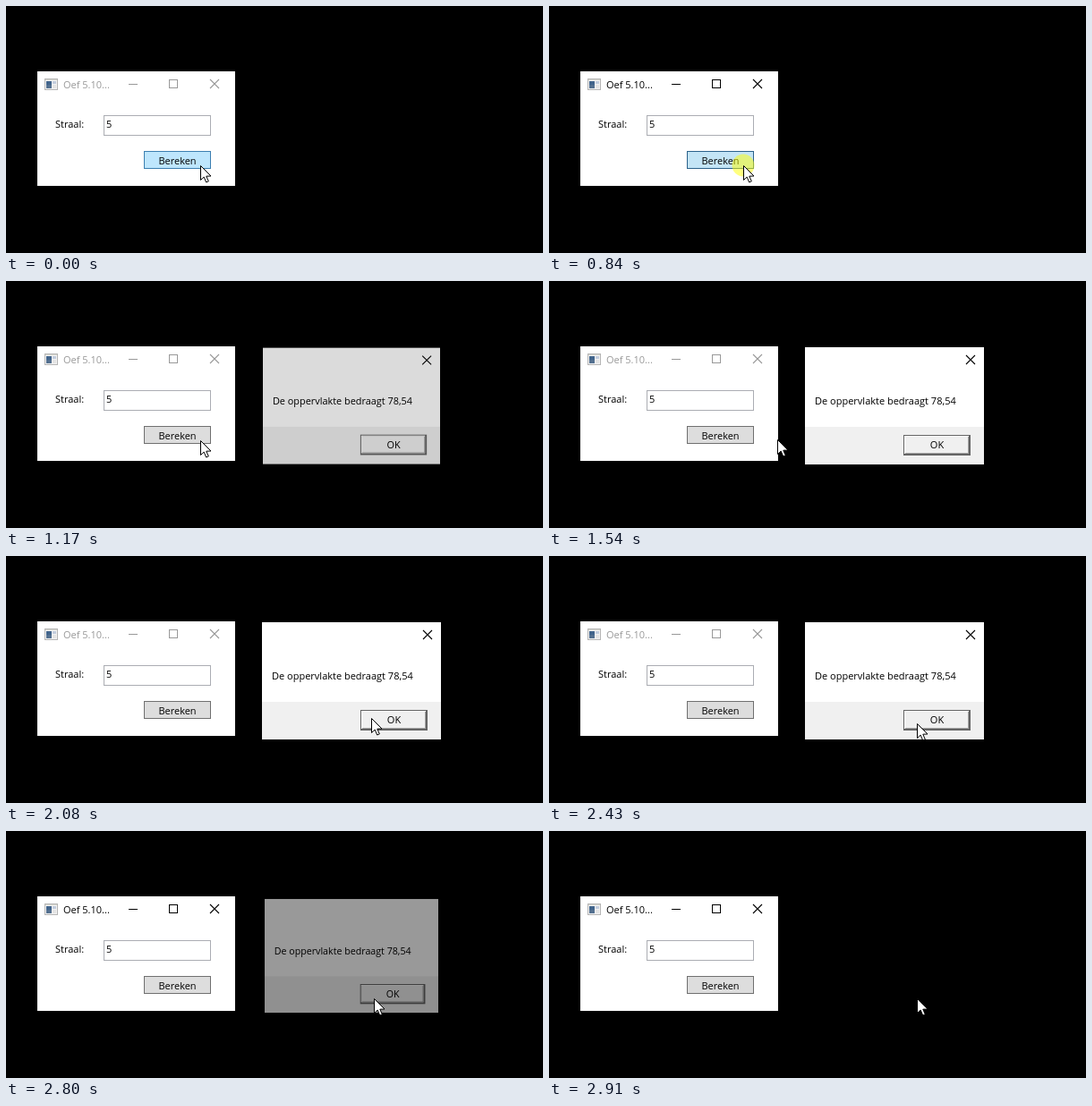
An HTML page with a canvas for the animation above (4.23 s loop, 600 px wide and 276 px high).

```html
<!DOCTYPE html>
<html lang="nl">
<head>
<meta charset="utf-8">
<style>
html, body { margin: 0; width: 100%; height: 100%; overflow: hidden; background: #000; }
canvas { display: block; width: 600px; height: 276px; }
</style>
</head>
<body>
<canvas id="stage" width="600" height="276"></canvas>
<script>
const ctx = document.getElementById('stage').getContext('2d');
const LOOP = 4230;

// Each row holds from its time until the next row.
const cursorKeys = [
  [0, 217, 178],
  [1540, 255, 177], [1610, 295, 175], [1690, 333, 175], [1770, 362, 176],
  [1850, 384, 177], [1920, 397, 178], [2000, 404, 179],
  [2080, 408, 181], [2190, 409, 183], [2270, 410, 185], [2350, 411, 186], [2430, 411, 187]
];
const titleKeys = [[0, false], [840, true], [1030, false], [2720, true]];
const buttonKeys = [[0, 'hover'], [840, 'down'], [900, 'hover'], [1100, 'idle']];
const glowKeys = [[0, 0], [840, 0.5], [900, 0.25], [970, 0], [2580, 0.5], [2630, 0.25], [2680, 0]];
// time, opacity, scale
const dialogKeys = [
  [0, 0, 1], [1100, 0.5, 0.96], [1170, 0.86, 0.99], [1240, 0.97, 1], [1300, 1, 1],
  [2800, 0.6, 0.97], [2860, 0.25, 0.94], [2910, 0, 1]
];
const buttonColors = {
  idle: ['#dddddd', '#707070'],
  hover: ['#bee6fd', '#3c7fb1'],
  down: ['#c4e5f6', '#2c628b']
};

function keyAt(keys, t) {
  let row = keys[0];
  for (const k of keys) if (k[0] <= t) row = k;
  return row;
}

function rect(x, y, w, h, color) {
  ctx.fillStyle = color;
  ctx.fillRect(x, y, w, h);
}

function box(x, y, w, h, fill, border) {
  rect(x, y, w, h, border);
  rect(x + 1, y + 1, w - 2, h - 2, fill);
}

function text(str, x, y, color = '#000', align = 'left') {
  ctx.font = '11px "Open Sans", "Noto Sans", sans-serif';
  ctx.textAlign = align;
  ctx.fillStyle = color;
  ctx.fillText(str, x, y);
}

function cross(x, y, color) {
  ctx.strokeStyle = color;
  ctx.lineWidth = 1.1;
  ctx.beginPath();
  ctx.moveTo(x, y);
  ctx.lineTo(x + 10, y + 10);
  ctx.moveTo(x + 10, y);
  ctx.lineTo(x, y + 10);
  ctx.stroke();
}

function icon(x, y) {
  box(x, y, 15, 13, '#f2f2f2', '#b5b5b5');
  rect(x + 1, y + 1, 13, 1, '#d8d8d0');
  rect(x + 2, y + 3, 6, 8, '#41648c');
  rect(x + 2, y + 7, 6, 4, '#53708f');
  rect(x + 9, y + 3, 4, 3, '#c3cddd');
  rect(x + 9, y + 7, 4, 4, '#e4e4e4');
}

function mainWindow(active, button) {
  const ink = active ? '#000' : '#999';
  rect(35, 73, 221, 128, '#fff');
  icon(43, 81);
  text('Oef 5.10...', 64, 92, ink);
  rect(137, 87, 10, 1, ink);
  box(182, 82, 10, 10, '#fff', ink);
  cross(228, 82, ink);
  text('Straal:', 55, 136);
  box(109, 122, 120, 23, '#fff', '#abadb3');
  text('5', 112, 136);
  box(154, 162, 75, 20, ...buttonColors[button]);
  text('Bereken', 191.5, 177, '#000', 'center');
}

function dialog(alpha, scale, focused) {
  ctx.save();
  ctx.translate(386, 139.5);
  ctx.scale(scale, scale);
  ctx.translate(-386, -139.5);
  rect(286, 74, 200, 131, '#fff');
  rect(286, 163, 200, 42, '#f0f0f0');
  if (focused) cross(466, 83, '#000');
  text('De oppervlakte bedraagt 78,54', 297, 138);
  rect(396, 172, 75, 23, '#646464');
  rect(397, 173, 72, 20, '#fff');
  rect(398, 174, 71, 19, '#a0a0a0');
  rect(398, 174, 70, 18, '#f0f0f0');
  text('OK', 433.5, 187, '#000', 'center');
  // The backdrop is black, so fading is a dark veil.
  rect(285, 73, 202, 133, `rgba(0,0,0,${1 - alpha})`);
  ctx.restore();
}

function glow(x, y, alpha) {
  ctx.fillStyle = `rgba(255,255,0,${alpha})`;
  ctx.beginPath();
  ctx.arc(x, y, 12.5, 0, Math.PI * 2);
  ctx.fill();
}

function pointer(x, y) {
  const shape = [[0, 0], [0, 16], [3.7, 12.6], [6.2, 18.5], [8.8, 17.4], [6.3, 11.7], [11.5, 11.5]];
  ctx.beginPath();
  for (const [dx, dy] of shape) ctx.lineTo(x + 0.5 + dx, y + 0.5 + dy);
  ctx.closePath();
  ctx.fillStyle = '#fff';
  ctx.fill();
  ctx.strokeStyle = '#000';
  ctx.lineWidth = 1;
  ctx.stroke();
}

function draw(t) {
  const [, x, y] = keyAt(cursorKeys, t);
  const [, alpha, scale] = keyAt(dialogKeys, t);
  const glowAlpha = keyAt(glowKeys, t)[1];
  rect(0, 0, 600, 276, '#000');
  mainWindow(keyAt(titleKeys, t)[1], keyAt(buttonKeys, t)[1]);
  if (alpha) dialog(alpha, scale, t < 2720);
  if (glowAlpha) glow(x, y, glowAlpha);
  pointer(x, y);
}

const start = performance.now();
function tick() {
  draw((performance.now() - start) % LOOP);
  requestAnimationFrame(tick);
}
tick();
</script>
</body>
</html>
```
